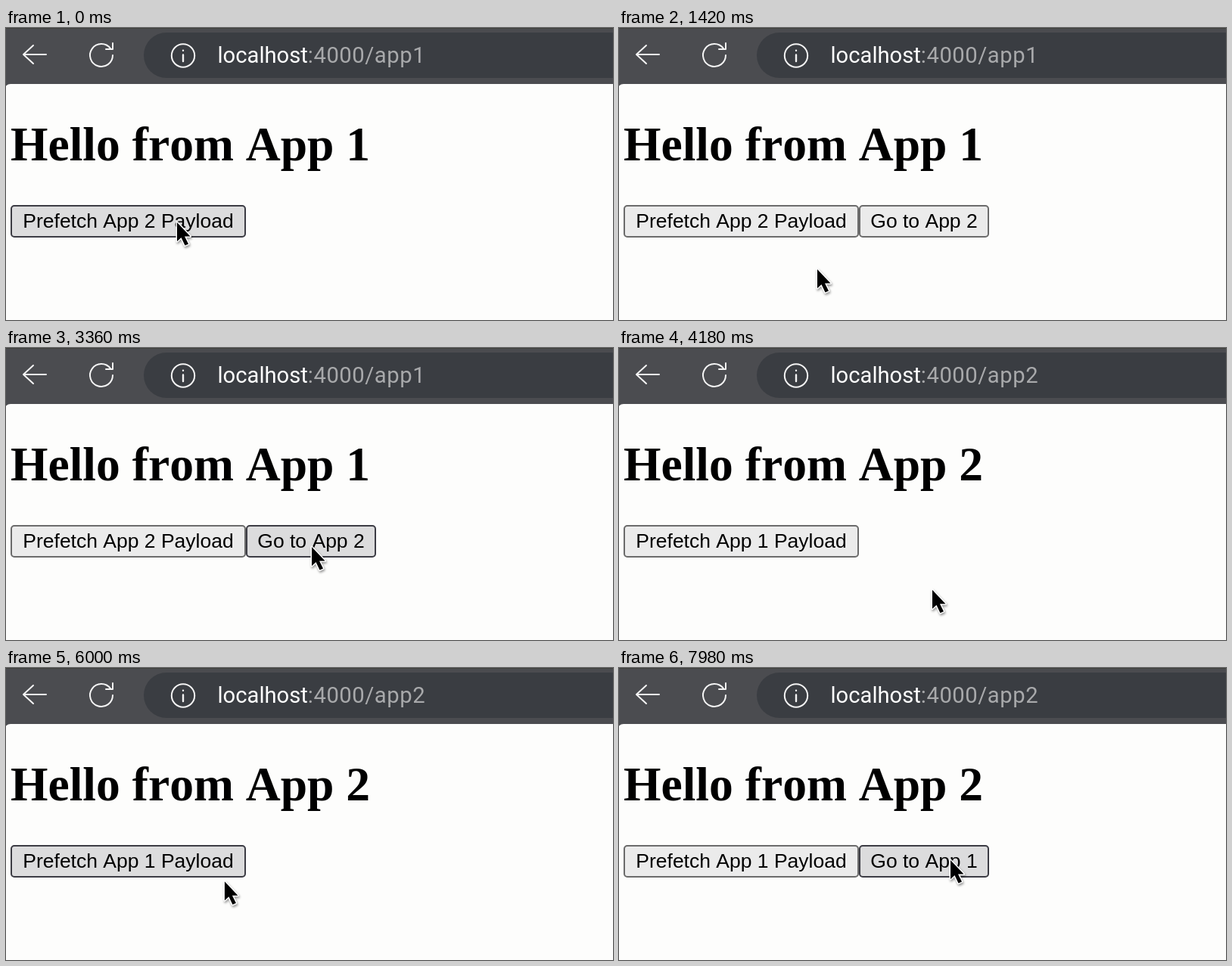
An HTML page for the animation above (8 s loop, 802x386 px).

```html
<!DOCTYPE html>
<html lang="en">
<head>
<meta charset="utf-8">
<title>App prefetch demo</title>
<style>
  html, body { margin: 0; width: 100%; height: 100%; overflow: hidden; background: #fdfdfc; }
  svg { display: block; width: 100%; height: 100%; }
  .icon { fill: none; stroke: #f4f4f4; stroke-width: 2; stroke-linecap: round; stroke-linejoin: round; }
  .url { font: 29.2px Roboto, sans-serif; fill: #a8a9ab; letter-spacing: .55px; }
  .host { fill: #fff; letter-spacing: 0; }
  .title { font: bold 63.6px "Liberation Serif", serif; font-kerning: none; }
  .button rect { fill: #ebebeb; stroke: #6b6b6b; stroke-width: 2; }
  .button.hover rect { fill: #dcdcdd; stroke: #3c3c44; }
  .button text { font: 26.5px "Liberation Sans", sans-serif; font-kerning: none; text-anchor: middle; }
  #cursor { filter: drop-shadow(1px 2px 1.5px #0006); }
</style>
</head>
<body>
<svg viewBox="0 0 802 386">
  <rect width="802" height="84" fill="#4b4c50"/>
  <rect width="802" height="1" fill="#3f403c"/>
  <rect x="182" y="6" width="700" height="60" rx="30" fill="#3a3d42"/>
  <rect y="74" x="-2" width="830" height="400" rx="8" fill="#fdfdfc"/>

  <g class="icon">
    <path d="M53 35H23M36 23L23 35L36 47"/>
    <path d="M138 27A15 15 0 1 0 141 36M141 20V28H132"/>
    <circle cx="234" cy="36.5" r="15.2"/>
    <path d="M234 35.5V44M234 29.6V29.8" stroke-width="2.4"/>
  </g>
  <text class="url" x="279.5" y="46"><tspan class="host">localhost</tspan>:4000/app<tspan id="path"></tspan></text>

  <text class="title" x="6" y="175">Hello from App <tspan id="title"></tspan></text>
  <g class="button" id="prefetch">
    <rect x="7" y="235" width="309" height="41" rx="4"/>
    <text x="161.5" y="264"></text>
  </g>
  <g class="button" id="go">
    <rect x="318" y="235" width="170" height="41" rx="4"/>
    <text x="403" y="264"></text>
  </g>

  <path id="cursor" d="M0 1V26L5.5 21L10.5 31.5L15 29.5L10 19.5H17.5Z"
    stroke="#fff" stroke-width="3" stroke-linejoin="round" paint-order="stroke"/>
</svg>
<script>
const LOOP = 8000;
const SHOW_GO = [400, 6300];
const NAVIGATE = 3500;

// Pointer tip: [time, x, y]
const pointerPath = [
  [0, 226, 256], [500, 226, 256], [920, 255, 318], [1130, 262, 340],
  [1400, 262, 318], [1680, 262, 318], [2300, 404, 262], [3750, 404, 262],
  [4200, 414, 319], [4950, 375, 334], [5200, 305, 290], [5850, 300, 305],
  [6150, 278, 258], [6420, 278, 258], [6600, 282, 281], [6720, 286, 296],
  [7100, 286, 296], [7800, 438, 253], [LOOP, 438, 253]
];

const byId = id => document.getElementById(id);
const ease = u => u * u * (3 - 2 * u);

function pointerAt(t) {
  const i = pointerPath.findIndex(key => key[0] > t);
  const [t0, x0, y0] = pointerPath[i - 1];
  const [t1, x1, y1] = pointerPath[i];
  const u = ease((t - t0) / (t1 - t0));
  return [x0 + (x1 - x0) * u, y0 + (y1 - y0) * u];
}

function setButton(id, label, hovered) {
  const button = byId(id);
  button.querySelector("text").textContent = label;
  button.classList.toggle("hover", hovered);
}

function draw(t) {
  const app = t < NAVIGATE ? 1 : 2;
  const other = 3 - app;
  const [x, y] = pointerAt(t);
  const overRow = y > 234 && y < 284;

  byId("path").textContent = app;
  byId("title").textContent = app;
  setButton("prefetch", `Prefetch App ${other} Payload`, overRow && x < 317);
  setButton("go", `Go to App ${other}`, overRow && x >= 317 && x < 489);
  byId("go").style.display = t >= SHOW_GO[app - 1] ? "" : "none";
  byId("cursor").setAttribute("transform", `translate(${x} ${y})`);
}

function tick() {
  draw(performance.now() % LOOP);
  requestAnimationFrame(tick);
}
tick();
</script>
</body>
</html>
```
